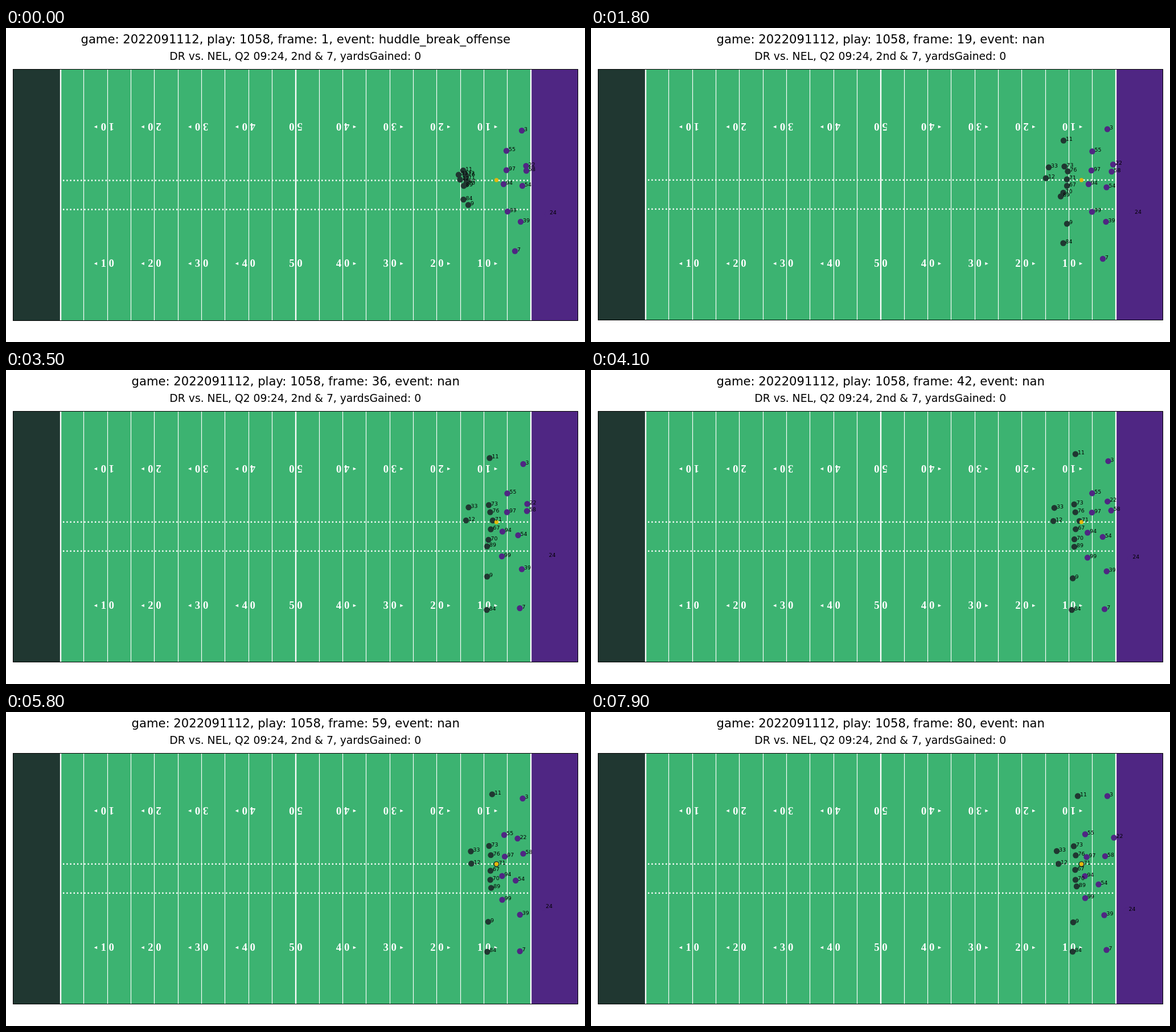
An HTML page with a canvas for the animation above (8 s loop, 1017 px wide and 551 px high).

```html
<!DOCTYPE html>
<html lang="en">
<head>
<meta charset="utf-8">
<title>Play tracking</title>
<style>
html, body { margin: 0; width: 100%; height: 100%; overflow: hidden; background: #fff; }
canvas { display: block; width: 1017px; height: 551px; }
</style>
</head>
<body>
<canvas id="stage" width="1017" height="551"></canvas>
<script>
const ctx = document.getElementById('stage').getContext('2d');
const LOOP = 8000, STEP = 100;
const TIMES = [0, 9, 18, 35, 48, 68, 79]; // key poses, in steps
const GREEN = '#3cb371', DARK = '#203731', PURPLE = '#4f2683', GOLD = '#e3b90c';
const LEFT = 12.5, TOP = 72.5, WIDTH = 992, YARD = WIDTH / 120;
const SANS = '"DejaVu Sans", sans-serif';
const SERIF = '"Liberation Serif", "Times New Roman", serif';
const yardX = yd => 12.9 + yd * YARD;

// Monotone cubic through the key values.
function curve(vals) {
  const n = vals.length;
  const gap = i => TIMES[i + 1] - TIMES[i];
  const slope = i => (vals[i + 1] - vals[i]) / gap(i);
  const tan = vals.map((_, i) => {
    if (i === 0) return slope(0);
    if (i === n - 1) return slope(n - 2);
    const a = slope(i - 1), b = slope(i);
    if (a * b <= 0) return 0;
    const u = 2 * gap(i) + gap(i - 1), v = gap(i) + 2 * gap(i - 1);
    return (u + v) / (u / a + v / b);
  });
  return s => {
    let i = 0;
    while (i < n - 2 && s >= TIMES[i + 1]) i++;
    const h = gap(i), p = (s - TIMES[i]) / h, q = 1 - p;
    return vals[i] * (1 + 2 * p) * q * q + tan[i] * h * p * q * q
      + vals[i + 1] * p * p * (3 - 2 * p) - tan[i + 1] * h * p * p * q;
  };
}

const players = [];
function add(color, label, ...path) {
  players.push({
    color, label,
    x: curve(path.filter((_, i) => i % 2 === 0)),
    y: curve(path.filter((_, i) => i % 2 === 1))
  });
}
const home = (label, ...path) => add(DARK, label, ...path);
const away = (label, ...path) => add(PURPLE, label, ...path);

home('11', 803, 250, 816, 223.5, 830, 197.5, 849.5, 154.5, 852, 143.5, 855, 146, 855, 147.5);
home('73', 807, 257, 816, 250.5, 831.5, 243, 848, 237, 849, 235, 848, 235, 848, 235.5);
home('76', 808, 259.5, 821, 255.5, 837.5, 251.5, 850.5, 249.5, 851, 250, 852, 252, 851.5, 251.5);
home('33', 795, 257.5, 796.5, 255, 804, 244.5, 812.5, 241, 815, 243.5, 817.5, 245, 818, 244);
home('12', 797.5, 266, 797.5, 265.5, 799, 263.5, 808, 264, 816, 266, 818.5, 266, 821, 266.5);
home('71', 808, 265, 817, 265, 836, 265.5, 855, 264, 860, 266.5, 862, 267, 861.5, 267);
home('67', 809, 271, 819.5, 273, 836, 277, 851.5, 279.5, 851, 279, 851, 278, 850.5, 277);
home('70', 808, 274.5, 817, 281.5, 829.5, 289, 847.5, 298, 850, 295.5, 851, 294, 851, 294.5);
home('89', 804, 277, 813, 287.5, 825, 295.5, 845, 309.5, 851.5, 310.5, 852.5, 306.5, 853, 306);
home('9', 812, 310.5, 825, 326, 836, 343.5, 845, 362.5, 847, 367.5, 847, 368.5, 847, 369);
home('84', 803.5, 301, 815, 337.5, 829.5, 377.5, 844.5, 421, 844.5, 421, 846, 420.5, 846, 420.5);

away('3', 906, 180, 906.5, 178.5, 907, 177.5, 908.5, 165, 908.5, 155, 906.5, 149.5, 907, 147.5);
away('55', 879, 215.5, 880, 215.5, 880.5, 216.5, 880.5, 216.5, 879.5, 216, 870, 215.5, 868, 214.5);
away('22', 913.5, 242, 914.5, 240.5, 917, 239.5, 915.5, 235, 897.5, 225.5, 901.5, 220.5, 918.5, 220.5);
away('58', 914, 250.5, 914.5, 251, 914.5, 252, 915, 247.5, 911, 246, 906, 252, 903, 253);
away('97', 879, 249.5, 879, 250, 879, 250, 880, 249.5, 879.5, 251.5, 872, 255, 870.5, 254.5);
away('94', 874, 274, 874, 273.5, 874, 274, 872, 283.5, 872.5, 287, 869.5, 288, 867.5, 288);
away('54', 907, 277, 907, 277, 905.5, 279.5, 899.5, 290, 898, 295, 892.5, 296.5, 891.5, 302.5);
away('99', 881, 322, 881, 322, 880, 322.5, 871, 327, 873.5, 331, 869, 327.5, 868, 326.5);
away('39', 904, 340, 904, 339.5, 904.5, 340, 906, 349.5, 905, 356, 901, 355.5, 901.5, 356.5);
away('7', 894, 391.5, 896, 397.5, 899, 405, 902.5, 418, 901.5, 420.5, 904.5, 418.5, 905.5, 417.5);
away('24', 951, 326.5, 951, 325, 951, 325, 949.5, 327.2, 944.5, 336.5, 943.5, 347.7, 940.5, 348.7);

function text(str, x, y, font, color, align) {
  ctx.font = font;
  ctx.fillStyle = color;
  ctx.textAlign = align;
  ctx.fillText(str, x, y);
}

function line(x1, y1, x2, y2, width, dash = []) {
  ctx.strokeStyle = '#fff';
  ctx.lineWidth = width;
  ctx.setLineDash(dash);
  ctx.beginPath();
  ctx.moveTo(x1, y1);
  ctx.lineTo(x2, y2);
  ctx.stroke();
  ctx.setLineDash([]);
}

function disc(x, y, r, color) {
  ctx.fillStyle = color;
  ctx.beginPath();
  ctx.arc(x, y, r, 0, Math.PI * 2);
  ctx.fill();
}

function arrow(x, y, dir) {
  ctx.fillStyle = '#fff';
  ctx.beginPath();
  ctx.moveTo(x + 3 * dir, y);
  ctx.lineTo(x - 2.5 * dir, y - 2.6);
  ctx.lineTo(x - 2.5 * dir, y + 2.6);
  ctx.fill();
}

function yardMark(yd, y, flip) {
  const x = yardX(yd), num = 50 - Math.abs(yd - 60);
  ctx.save();
  ctx.translate(x, y);
  if (flip) ctx.rotate(Math.PI);
  text(String(num).split('').join(' '), 0, 6.3, 'bold 18.78px ' + SERIF, '#fff', 'center');
  ctx.restore();
  const dir = Math.sign(yd - 60);
  if (dir) arrow(x + dir * 20.6, y + 0.4, dir);
}

function field(height, hashes) {
  const left = Math.round(yardX(10)), right = Math.round(yardX(110));
  ctx.fillStyle = GREEN;
  ctx.fillRect(LEFT, TOP, WIDTH, height);
  ctx.fillStyle = DARK;
  ctx.fillRect(LEFT, TOP, left - LEFT, height);
  ctx.fillStyle = PURPLE;
  ctx.fillRect(right, TOP, LEFT + WIDTH - right, height);
  for (let yd = 10; yd <= 110; yd += 5) {
    const thick = yd % 50 === 10;
    const x = thick ? Math.round(yardX(yd)) : Math.floor(yardX(yd)) + 0.5;
    line(x, TOP, x, TOP + height, thick ? 2.35 : 1.17);
  }
  for (const y of [hashes, hashes + 51]) line(100, y, right, y, 2.35, [2.35, 3.87]);
  for (let yd = 20; yd <= 100; yd += 10) {
    yardMark(yd, 173, true);
    yardMark(yd, 413, false);
  }
  ctx.strokeStyle = '#000';
  ctx.lineWidth = 1;
  ctx.strokeRect(LEFT, TOP, WIDTH, height);
}

function draw(step) {
  ctx.fillStyle = '#fff';
  ctx.fillRect(0, 0, 1017, 551);
  const first = step === 0;
  const event = first ? 'huddle_break_offense' : 'nan';
  text(`game: 2022091112, play: 1058, frame: ${step + 1}, event: ${event}`,
    508.7, 27.2, '21.13px ' + SANS, '#000', 'center');
  text('DR vs. NEL, Q2 09:24, 2nd & 7, yardsGained: 0',
    508.3, 55.6, '18.78px ' + SANS, '#000', 'center');
  // The event title with underscores leaves the field one pixel taller.
  field(first ? 441 : 440, first ? 267.5 : 266.7);

  const spots = players.map(p => ({ ...p, x: p.x(step), y: p.y(step) }));
  for (const p of spots) disc(p.x, p.y, 5.2, p.color);
  disc(861.5, 266.8, 3.6, GOLD);
  for (const p of spots) text(p.label, p.x + 4.1, p.y + 0.7, '9.39px ' + SANS, '#000', 'left');
}

const start = performance.now();
let shown = -1;
function tick() {
  const step = Math.floor(((performance.now() - start) % LOOP) / STEP);
  if (step !== shown) draw(shown = step);
  requestAnimationFrame(tick);
}
tick();
</script>
</body>
</html>
```
